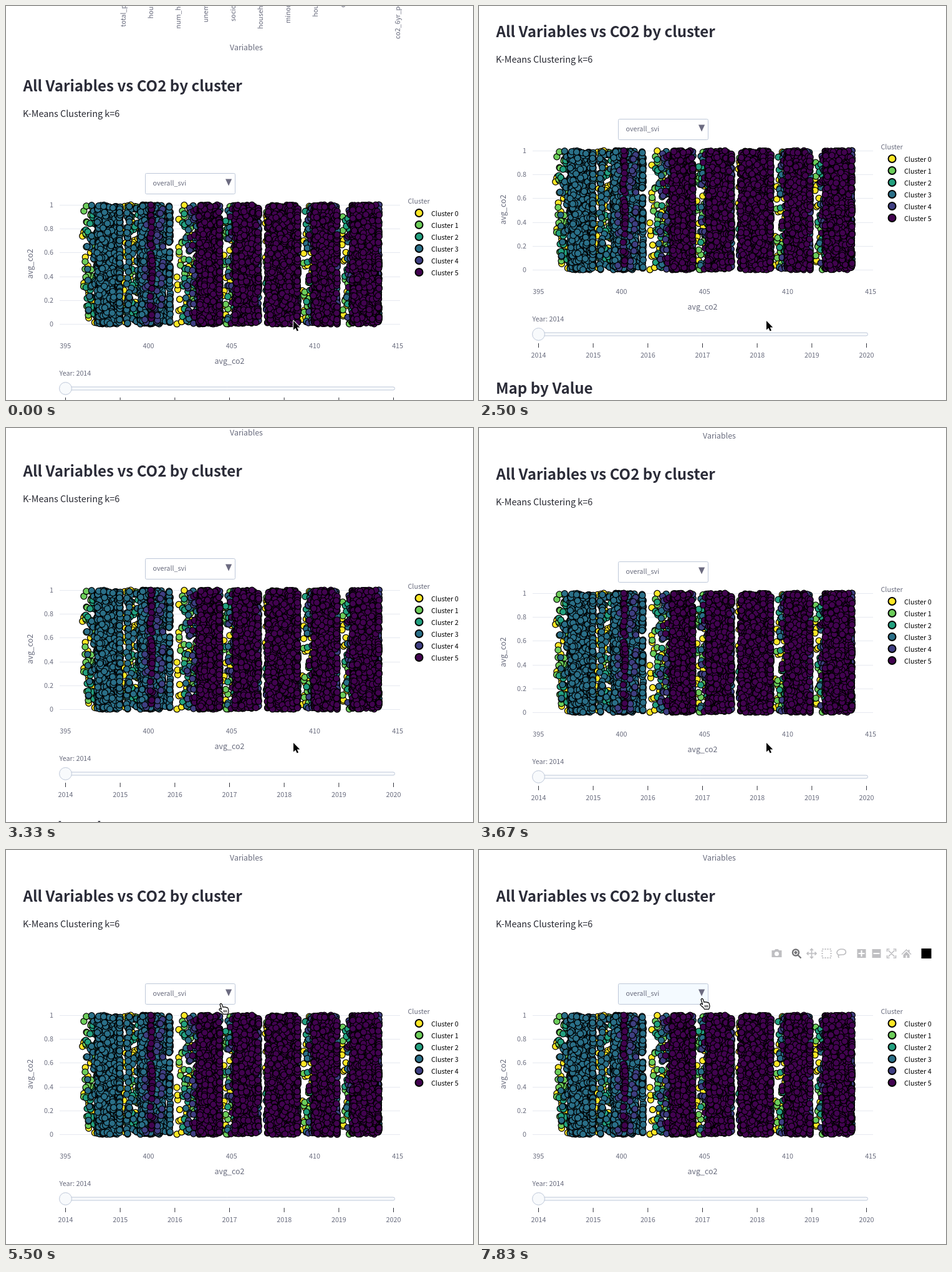
These frames come from a looping animation (749 by 632 pixels, 8 s). An HTML page with a canvas:

```html
<!DOCTYPE html>
<html lang="en">
<head>
<meta charset="utf-8">
<title>All Variables vs CO2 by cluster</title>
<style>
  html, body { margin: 0; width: 100%; height: 100%; overflow: hidden; background: #fff; }
  canvas { display: block; width: 749px; height: 632px; }
</style>
</head>
<body>
<canvas id="stage"></canvas>
<script>
const W = 749, H = 632, LOOP = 8000, STEP = 500 / 3;
const FONT = '"Noto Sans CJK JP", "Noto Sans CJK SC", "Noto Sans CJK", "Open Sans", sans-serif';
const INK = '#262730', GRAY = '#686b7d', BORDER = '#bec8d9';
const SMALL = 10.75, MEDIUM = 12.4;
const PLOT = { top: 265, bottom: 456, left: 86, right: 632 };
const COLORS = ['#fde725', '#6ccd5a', '#22a07f', '#2a6f88', '#3f3f82', '#420350'];
const [BLUE, INDIGO, PURPLE] = [3, 4, 5];

// One vertical band per group of readings: a fringe on the left, a packed core, a thin column on the right
const BANDS = [
  { fringe: 120, left: 146, right: 180, column: 183, main: BLUE },
  { fringe: 187, left: 215, right: 252, column: 263, main: BLUE },
  { fringe: 273, left: 309, right: 339, column: 343, main: PURPLE },
  { fringe: 347, left: 367, right: 399, column: 405, main: PURPLE },
  { fringe: 416, left: 419, right: 466, column: 468, main: PURPLE },
  { fringe: 474, left: 493, right: 523, column: 531, main: PURPLE },
  { fringe: 538, left: 555, right: 593, column: 598, main: PURPLE }
];

const stage = document.getElementById('stage');
const dpr = window.devicePixelRatio || 1;
const ctx = prepare(stage);
const scatter = document.createElement('canvas');
drawScatter(prepare(scatter));

function prepare(canvas) {
  canvas.width = W * dpr;
  canvas.height = H * dpr;
  const c = canvas.getContext('2d');
  c.scale(dpr, dpr);
  return c;
}

function randomizer(seed) {
  return () => {
    seed = (seed * 1664525 + 1013904223) >>> 0;
    return seed / 4294967296;
  };
}

function circle(c, x, y, r, fill, stroke, width) {
  c.beginPath();
  c.arc(x, y, r, 0, Math.PI * 2);
  c.fillStyle = fill;
  c.fill();
  c.strokeStyle = stroke;
  c.lineWidth = width;
  c.stroke();
}

function drawScatter(c) {
  const random = randomizer(2014);
  const dots = [];
  const spread = (cluster, left, right, count, bias = 1) => {
    for (let i = 0; i < count; i++)
      dots.push({
        cluster,
        x: right - (right - left) * random() ** bias,
        y: PLOT.top + (PLOT.bottom - PLOT.top) * random()
      });
  };

  for (const { fringe, left, right, column, main } of BANDS) {
    const width = left - fringe;
    // Later clusters stay closer to the core and are rarer in the fringe
    for (let k = 0; k <= main; k++)
      spread(k, left - width * (1 - 0.12 * k), left, width * (1.4 - 0.2 * k), 1.3);
    spread(main, left, right, 30 * (right - left));
    for (let k = BLUE; k <= main; k++) {
      spread(k, right, column, 3 * (column - right));
      spread(k, column - 1.5, column + 0.5, 90 / (main - BLUE + 1));
    }
  }
  spread(BLUE, 193, 198, 40);
  spread(INDIGO, 222, 252, 45);
  spread(PURPLE, 231, 235, 45);

  dots.sort((a, b) => a.cluster - b.cluster);
  for (const { x, y, cluster } of dots) circle(c, x, y, 5, COLORS[cluster], '#000', 1.25);
}

// y is the middle of the capital letters
function text(str, x, y, { size = SMALL, color = GRAY, align = 'left', weight = 400 } = {}) {
  ctx.font = `${weight} ${size}px ${FONT}`;
  ctx.fillStyle = color;
  ctx.textAlign = align;
  ctx.fillText(str, x, y + size * 0.367);
}

function vertical(str, x, y, options) {
  ctx.save();
  ctx.translate(x, y);
  ctx.rotate(-Math.PI / 2);
  text(str, 0, 0, options);
  ctx.restore();
}

function line(x1, y1, x2, y2, color) {
  ctx.beginPath();
  ctx.moveTo(x1, y1);
  ctx.lineTo(x2, y2);
  ctx.strokeStyle = color;
  ctx.lineWidth = 1;
  ctx.stroke();
}

function box(x, y, w, h, r, fill) {
  ctx.beginPath();
  ctx.roundRect(x, y, w, h, r);
  ctx.fillStyle = fill;
  ctx.fill();
  ctx.strokeStyle = BORDER;
  ctx.lineWidth = 1;
  ctx.stroke();
}

function drawHeadings() {
  const labels = ['total_population', 'housing_units', 'num_households', 'unemployment', 'socioeconomic',
    'household_comp', 'minority_status', 'housing_type', 'overall_svi', '', 'co2_6yr_pct_change'];
  labels.forEach((name, i) => vertical(name, 188 + 44 * i, -105, { align: 'right' }));
  text('Variables', 385.5, 12, { size: MEDIUM, align: 'center' });
  const heading = { size: 24.1, color: '#2b2c38', weight: 600 };
  text('All Variables vs CO2 by cluster', 27.5, 74, heading);
  text('Map by Value', 27, 646, heading);
  text('K-Means Clustering k=6', 27, 118.5, { size: 14.4, color: INK });
}

function drawChart() {
  for (let i = 0; i <= 5; i++) {
    const y = PLOT.bottom - 38.2 * i;
    line(PLOT.left, Math.round(y) + 0.5, PLOT.right, Math.round(y) + 0.5, '#e6e9f0');
    text(String(i / 5), 76, y, { align: 'right' });
  }
  for (let i = 0; i < 5; i++)
    text(String(395 + 5 * i), 95.3 + 133.2 * i, 491, { align: 'center' });
  const title = { size: MEDIUM, align: 'center' };
  text('avg_co2', 358.5, 515, title);
  vertical('avg_co2', 38, 359.5, title);
  ctx.drawImage(scatter, 0, 0, W, H);

  text('Cluster', 644.5, 259);
  COLORS.forEach((color, i) => {
    const y = 278 + 19 * i;
    circle(ctx, 662.5, y, 6, color, '#000', 2);
    text('Cluster ' + i, 682, y + 0.8, { color: '#000' });
  });
}

function drawDropdown(hovered) {
  box(223.5, 214.5, 144, 33, 2, hovered ? '#f4faff' : '#fff');
  text('overall_svi', 235.5, 230);
  ctx.fillStyle = '#6c6b80';
  ctx.fill(new Path2D('M352 223.5h10.2l-5.1 11z'));
}

function drawSlider() {
  text('Year: 2014', 85.5, 535);
  box(86, 557, 537.5, 5, 2.5, '#f8fafc');
  circle(ctx, 95.5, 559.5, 9.9, '#f8fafc', BORDER, 1);
  for (let i = 0; i <= 6; i++) {
    const x = 95.5 + 87.67 * i;
    line(x, 574, x, 581, '#33343c');
    text(String(2014 + i), x, 593, { align: 'center' });
  }
}

function icon(x, shape, { color = '#bfbfc2', filled = false, width = 1.7, dash = [] } = {}) {
  ctx.save();
  ctx.translate(x, 166);
  ctx.fillStyle = ctx.strokeStyle = color;
  ctx.lineWidth = width;
  ctx.setLineDash(dash);
  const path = new Path2D(shape);
  if (filled) ctx.fill(path, 'evenodd');
  else ctx.stroke(path);
  ctx.restore();
}

function drawToolbar() {
  const solid = { filled: true }, square = 'M-7-7h14v14h-14z';
  icon(477.5, 'M-8-5h4l2-2h4l2 2h4v11h-16zM-3.5.5a3.5 3.5 0 1 0 7 0a3.5 3.5 0 1 0-7 0z', solid);
  icon(509, 'M4-1.5a5 5 0 1 0-10 0a5 5 0 1 0 10 0M2.5 2.5l5 5M-3.5-1.5h5M-1-4v5', { color: '#747477', width: 2.4 });
  icon(533.5, 'M0-7v14M-7 0h14M-2.5-5l2.5-2.5l2.5 2.5M-2.5 5l2.5 2.5l2.5-2.5M-5-2.5l-2.5 2.5l2.5 2.5M5-2.5l2.5 2.5l-2.5 2.5');
  icon(557.5, square, { dash: [2, 2], width: 2 });
  icon(581.5, 'M-4 3c-7-4-2-10 4-10c9 0 9 9 1 9c-4 0-7 0-6 3q1 1 0 2');
  icon(613.5, square + 'M-5-1v2h4v4h2v-4h4v-2h-4v-4h-2v4z', solid);
  icon(637.5, square + 'M-5-1h10v2h-10z', solid);
  icon(661.5, 'M-7-3v-4h4M3-7h4v4M7 3v4h-4M-3 7h-4v-4M-5-5l10 10M5-5l-10 10');
  icon(685.5, 'M-8 1l8-8l3 3v-2h2v4l3 3l-1 1l-7-7l-7 7zM-5 2l5-5l5 5v5h-4v-4h-2v4h-4z', solid);
  icon(717.5, 'M-8-8h16v16h-16z', { color: '#000', filled: true });
}

function drawCursor({ x, y, hand }) {
  ctx.save();
  ctx.translate(x, y);
  ctx.lineJoin = 'round';
  if (hand) {
    const palm = new Path2D('M-1.8 1q1-3 3.2-.4l1.6 4.6q1.5-1 2.8 0q1.5-1 2.7.6q2-.5 2.7 1.6l.8 4q0 2-1.5 5h-7q-1-3-4-4.5l-2.5-2.5q0-3 2.4-1.4l1.2.8z');
    ctx.fillStyle = '#fff';
    ctx.fill(palm);
    ctx.strokeStyle = '#000';
    ctx.lineWidth = 1.2;
    ctx.stroke(palm);
    for (let i = 0; i < 3; i++) line(4.2 + 2.2 * i, 9.8, 4.8 + 2.1 * i, 13.4, '#000');
  } else {
    const arrow = new Path2D('M0 0v14.5l3.4-3.1l2.3 5.2l2.3-1l-2.3-5h4.6z');
    ctx.strokeStyle = '#fff';
    ctx.lineWidth = 2;
    ctx.stroke(arrow);
    ctx.fillStyle = '#000';
    ctx.fill(arrow);
  }
  ctx.restore();
}

function scrollAt(step) {
  if (step < 1) return 54;
  if (step < 15) return 34;
  if (step >= 22) return 0;
  return Math.round(-33 * Math.pow(5 / 33, (step - 15) / 5));
}

function mix(a, b, t) {
  const p = Math.max(0, Math.min(1, t));
  return a + (b - a) * p * p * (3 - 2 * p);
}

function cursorAt(step) {
  if (step < 33) {
    const p = (step - 29) / 4;
    return { x: mix(461, 345, p), y: mix(505, 247, p), hand: false };
  }
  const p = (step - 33) / 3;
  return { x: mix(345, 358, p), y: mix(247, 239, p), hand: true };
}

function frame(now) {
  const step = Math.floor((now % LOOP + 4) / STEP) % 48;
  const hovered = step >= 34;
  ctx.fillStyle = '#fff';
  ctx.fillRect(0, 0, W, H);
  ctx.save();
  ctx.translate(0, scrollAt(step));
  drawHeadings();
  drawChart();
  drawDropdown(hovered);
  drawSlider();
  if (hovered) drawToolbar();
  ctx.restore();
  drawCursor(cursorAt(step));
}

const start = performance.now();
function tick() {
  frame(performance.now() - start);
  requestAnimationFrame(tick);
}
tick();
</script>
</body>
</html>
```
